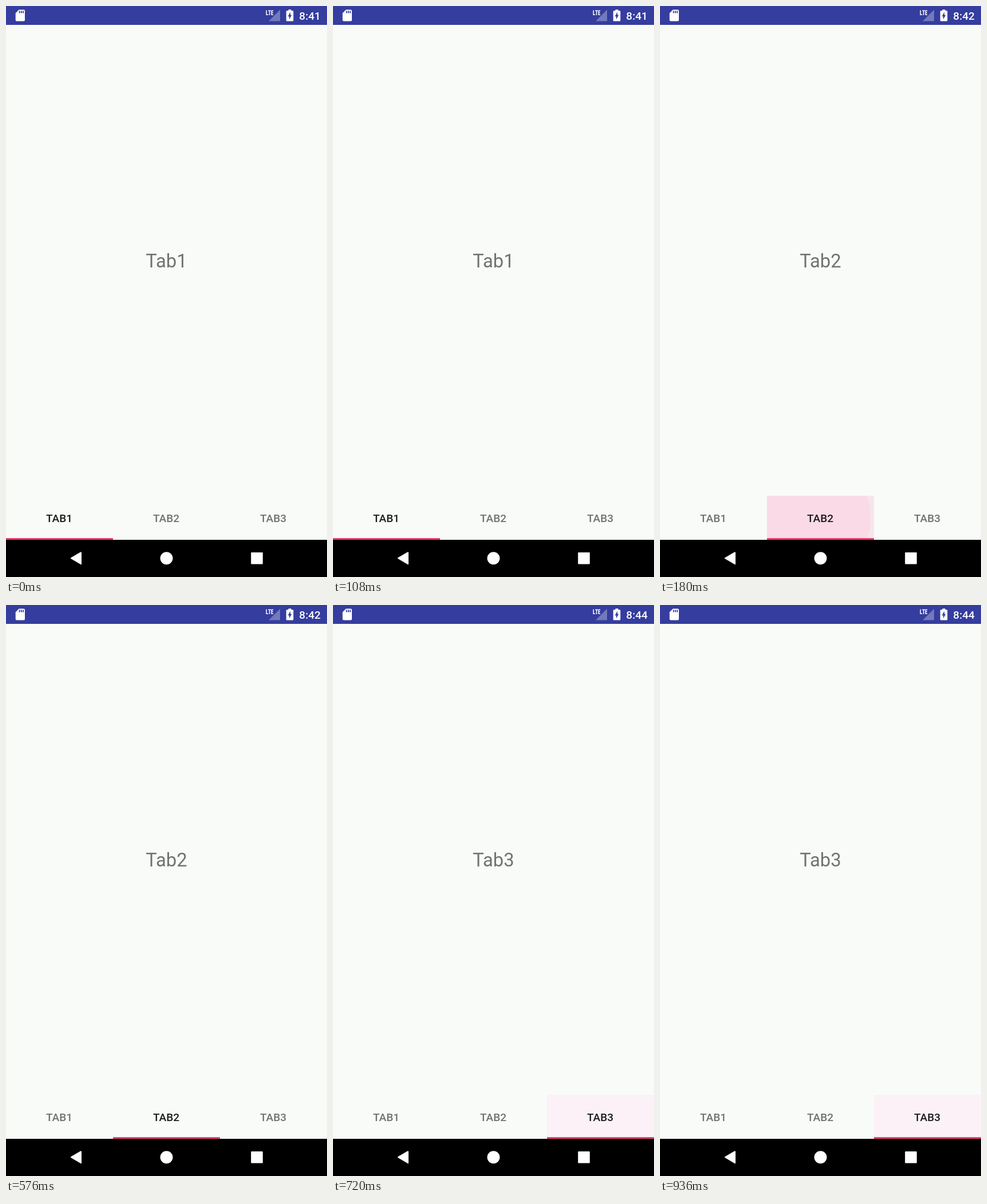
Write an HTML page that moves like this. It is 561 px wide and 998 px high and loops after 1.08 s.

```html
<!DOCTYPE html>
<html lang="en">
<head>
<meta charset="utf-8">
<title>Bottom tabs</title>
<style>
  html, body { margin: 0; width: 100%; height: 100%; overflow: hidden; background: #f9fbf8; }
  svg { display: block; width: 561px; height: 998px; }
  text { font-family: Roboto, sans-serif; }
  .mid { text-anchor: middle; }
  .label { font-size: 19.1px; font-weight: 500; fill: #717371; }
  .label.on { fill: #1c1c1c; }
  .page { font-size: 32.73px; fill: #717371; }
  .clock { font-size: 19.1px; font-weight: 500; fill: #fff; }
</style>
</head>
<body>
<svg viewBox="0 0 561 998">
  <defs>
    <clipPath id="cell"><rect x="187" y="856" width="187" height="77"/></clipPath>
  </defs>
  <rect width="561" height="998" fill="#f9fbf8"/>

  <!-- status bar -->
  <rect width="561" height="33" fill="#353d9e"/>
  <path fill="#fff" d="M22.6 6.5H31a2 2 0 0 1 2 2V24.500a2 2 0 0 1-2 2H18.700a2 2 0 0 1-2-2V12.400Z"/>
  <path stroke="#353d9e" stroke-width="1.9" d="M23.700 8.600v4M26.900 8.600v4M30.100 8.600v4"/>
  <path fill="#7279bd" d="M479 6.500V26.500H459Z"/>
  <path fill="none" stroke="#353d9e" stroke-width="4" d="M455 7.500V15.500H458M458.500 8.200H463M460.700 8V15.900M467 8.200H464.300V15.300H467M464.300 11.700H466.800"/>
  <path fill="none" stroke="#fff" stroke-width="1.5" d="M455.200 7.400V15.200H458.300M458.300 8.200H462.900M460.600 8V15.900M467.200 8.200H464.300V15.200H467.200M464.300 11.600H466.800"/>
  <path fill="#fff" d="M493.500 6.300H498.500V8.300H501a1.300 1.300 0 0 1 1.300 1.300V25.200a1.300 1.300 0 0 1-1.300 1.300H491a1.300 1.300 0 0 1-1.300-1.300V9.600A1.300 1.300 0 0 1 491 8.300H493.500Z"/>
  <path fill="#353d9e" d="M497 10.500V15.800H499.300L495 23.600V18.200H492.700Z"/>
  <text id="clock" class="clock" x="512.3" y="24"></text>

  <text id="page" class="page mid" x="280.5" y="457.300"></text>

  <!-- tab strip -->
  <g id="ripple" clip-path="url(#cell)">
    <rect x="187" y="856" width="187" height="77" fill="#f6e5ed"/>
    <circle cx="256" cy="895" r="112" fill="#fadae6"/>
  </g>
  <rect id="fade" x="374" y="856" width="187" height="77" fill="#fbf1f6"/>
  <rect id="line" y="930" width="187" height="3" fill="#e8396f"/>
  <g id="labels">
    <text class="label mid" x="93" y="902">TAB1</text>
    <text class="label mid" x="280" y="902">TAB2</text>
    <text class="label mid" x="467" y="902">TAB3</text>
  </g>

  <!-- navigation bar -->
  <rect y="933" width="561" height="65" fill="#000"/>
  <g fill="#fff" stroke="#fff" stroke-width="2" stroke-linejoin="round">
    <path d="M114 965.200L131 955.200V975.200Z"/>
    <circle cx="280.500" cy="965.200" r="10"/>
    <rect x="429.200" y="956" width="18.600" height="18.600"/>
  </g>
</svg>
<script>
  const LOOP = 1080;
  const steps = [
    { at: 0, tab: 0, time: "8:41" },
    { at: 180, tab: 1, time: "8:42", press: "ripple" },
    { at: 360, tab: 1, time: "8:42" },
    { at: 720, tab: 2, time: "8:44", press: "fade" }
  ];
  const el = id => document.getElementById(id);
  const labels = [...el("labels").children];
  let shown;

  function show(step) {
    if (step === shown) return;
    shown = step;
    el("clock").textContent = step.time;
    el("page").textContent = "Tab" + (step.tab + 1);
    el("line").setAttribute("x", step.tab * 187);
    labels.forEach((label, i) => label.classList.toggle("on", i === step.tab));
    for (const id of ["ripple", "fade"]) {
      el(id).style.display = step.press === id ? "" : "none";
    }
  }

  const start = performance.now();
  function tick(now) {
    const t = Math.max(0, now - start) % LOOP;
    show(steps.findLast(step => step.at <= t));
    requestAnimationFrame(tick);
  }
  tick(start);
</script>
</body>
</html>
```
